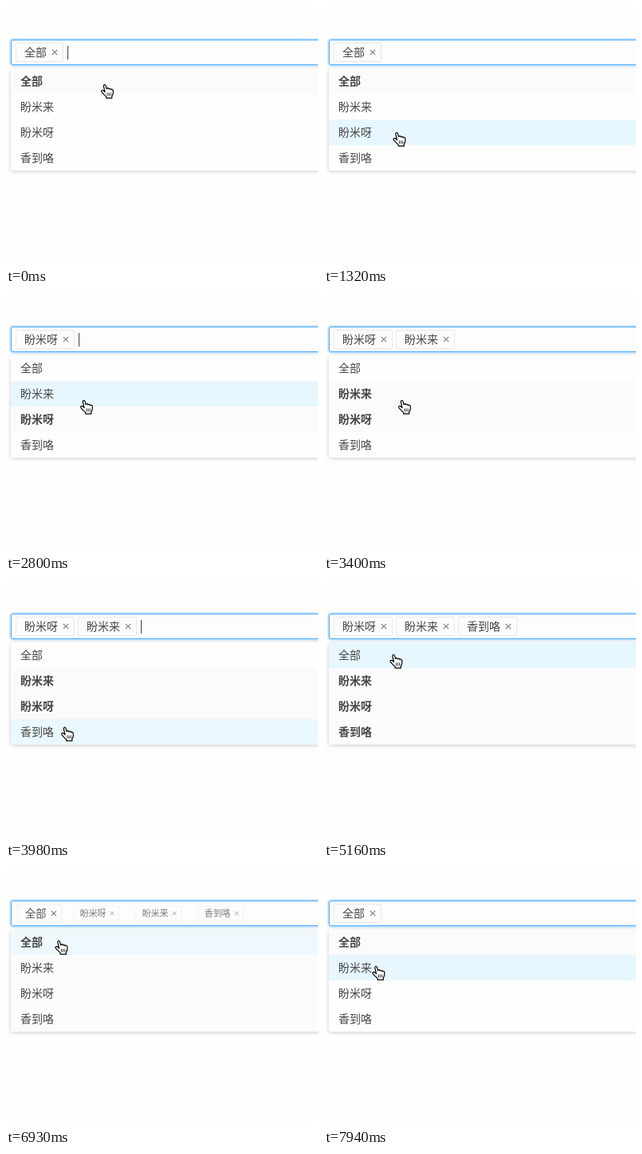
Animation, 391 px wide and 324 px high, one loop 8 s. Source, as an HTML page:

```html
<!DOCTYPE html>
<html lang="zh-CN">
<head>
<meta charset="utf-8">
<title>多选下拉框</title>
<style>
  html, body { margin: 0; width: 100%; height: 100%; overflow: hidden; background: #fefefe; }
  body {
    position: relative;
    font: 14px/22px "Noto Sans CJK SC", "Noto Sans CJK", "Noto Sans", sans-serif;
    color: #484848;
  }
  div, svg { position: absolute; box-sizing: border-box; }
  .field {
    left: 6px; top: 42px; width: 420px; height: 32px;
    border: 1px solid #40a9ff; border-radius: 3px; background: #fdfdfd;
    box-shadow: 0 0 0 2px rgba(24, 144, 255, .2);
  }
  .menu, .shade { left: 6px; top: 78px; width: 420px; height: 128px; border-radius: 4px; }
  .menu { overflow: hidden; }
  .shade { box-shadow: 0 1px 5px rgba(0, 0, 0, .2); }
  .row { left: 0; width: 100%; height: 32px; padding: 4px 12px; white-space: nowrap; }
  .tag {
    top: 46px; height: 24px; padding: 0 20px 0 10px; line-height: 20px; white-space: nowrap;
    border: 1px solid #e8e8e8; border-radius: 2px; background: #fcfcfc;
  }
  .tag svg { right: 6px; top: 7px; width: 8px; height: 8px; }
  .caret { top: 50px; width: 1px; height: 17px; background: #444; }
  .hand { left: 0; top: 0; width: 17px; height: 19px; overflow: visible; }
</style>
</head>
<body>
<div class="field"></div>
<div class="shade"></div>
<div class="menu"></div>
<div class="caret"></div>
<svg class="hand" viewBox="0 0 17 19" stroke="#000" stroke-linejoin="round" stroke-linecap="round">
  <path fill="#fff" stroke-width="1.2" d="M5.5 10.5 L3.9 3.6 C3.3 1.4 5.6 .4 6.4 2.4 L7.6 6.6
    C8.2 5.2 10.1 5.5 10.3 6.9 C11 5.8 12.8 6.2 12.9 7.6 C13.8 6.7 15.6 7.1 15.7 8.9 L15.9 11.6
    C15.9 13.4 14.6 14.4 14.3 16 V18.2 H7.2 V16.6 C5.6 15 3.4 12.9 1.6 10.8 C.2 9 2 7.6 3.6 8.8 Z"/>
  <path fill="none" stroke-width=".8" d="M8.5 11.8v3.2M10.6 11.8v3.2M12.7 11.8v3.2"/>
</svg>

<script>
const LOOP = 8000, TICK = 147.2, LEAD = 12;
const ZOOM = 200, FADE = 300, BLINK = 500;
const ZOOM_IN = 'cubic-bezier(.08,.82,.17,1)', ZOOM_OUT = 'cubic-bezier(.78,.14,.15,.86)';
const HOLD = 'step-end';
const PLAIN = '#fefefe', HOVER = '#e6f7ff', PICKED = '#fbfbfb';
const ALL = '全部', names = [ALL, '盼米来', '盼米呀', '香到咯'];
const clicks = [1520, 3160, 4330, 6836];

// Pointer moves: first tick, last tick, x, y
const moves = [
  [0, 3, 97, 139], [4, 7, 86, 157], [16, 18, 92.5, 133], [23, 27, 68.5, 183], [30, 34, 82, 92],
  [35, 40, 74, 98], [40, 43, 61, 91], [48, 53, 45, 121], [53, 54, 60, 123]
];

const $ = s => document.querySelector(s);
const smooth = p => p * p * (3 - 2 * p);
const clamp = p => Math.min(1, Math.max(0, p));

function handAt(ms) {
  let x = 118.5, y = 97;
  for (const [from, to, toX, toY] of moves) {
    const p = smooth(clamp((ms / TICK - from) / (to - from)));
    x += (toX - x) * p;
    y += (toY - y) * p;
  }
  return { x, y };
}
const hoverAt = ms => names[Math.floor((handAt(ms).y + 1 - 78) / 32)];

const tracks = [];
// steps: [ms, properties, easing to the next step]
function track(el, steps) {
  const list = [...steps, [LOOP, steps[steps.length - 1][1]]];
  const anim = el.animate(
    list.map(([ms, props, easing = HOLD]) => ({ offset: ms / LOOP, easing, ...props })),
    { duration: LOOP, fill: 'both' });
  anim.pause();
  tracks.push(anim);
}

function add(parent, cls, html) {
  const el = document.createElement('div');
  el.className = cls;
  el.innerHTML = html;
  parent.append(el);
  return el;
}

// Replay the clicks: 全部 clears the rest, any other option clears 全部
const widthOf = name => 32 + 14 * name.length;
const tags = [{ name: ALL, x: 12 }];
const states = [{ ms: 0, picked: [ALL], caret: 77 }];
let live = [...tags];
for (const ms of clicks) {
  const name = hoverAt(ms);
  const leaves = tag => name === ALL || tag.name === ALL;
  const leaving = live.filter(leaves);
  const fresh = { name, start: ms };
  tags.push(fresh);
  live = [...live.filter(tag => !leaves(tag)), fresh];
  let x = 12, caret;
  for (const tag of [...live, ...leaving]) {
    if (leaving.includes(tag)) Object.assign(tag, { end: ms, endX: x });
    else tag.x = x;
    x += widthOf(tag.name) + 4;
    if (tag === fresh) caret = x + 1;
  }
  states.push({ ms, picked: live.map(tag => tag.name), caret });
}
const stateAt = ms => states.filter(s => s.ms <= ms).pop();

// Menu rows
names.forEach((name, i) => {
  const el = add($('.menu'), 'row', name);
  el.style.top = i * 32 + 'px';
  track(el, states.map(s => [s.ms, { fontWeight: s.picked.includes(name) ? 600 : 400 }]));

  const colorAt = ms => stateAt(ms).picked.includes(name) ? PICKED : hoverAt(ms) === name ? HOVER : PLAIN;
  const changes = [];
  let last = colorAt(0);
  const steps = [[0, { backgroundColor: last }]];
  for (let ms = 10; ms < LOOP; ms += 10) {
    if (colorAt(ms) === last) continue;
    changes.push({ ms, from: last, to: last = colorAt(ms) });
  }
  changes.forEach(({ ms, from, to }, n) => {
    const next = changes[n + 1] ? changes[n + 1].ms : LOOP;
    steps.push([ms, { backgroundColor: from }, 'ease'], [Math.min(ms + FADE, next), { backgroundColor: to }]);
  });
  track(el, steps);
});

// Tags zoom in at their place and zoom out behind the ones that stay
const CROSS = '<svg viewBox="0 0 8 8" stroke="#808080" stroke-width="1.2"><path d="M.8 .8 7.2 7.2M7.2 .8 .8 7.2"/></svg>';
const shown = x => ({ left: x + 'px', opacity: 1, transform: 'scale(1)' });
const gone = x => ({ left: x + 'px', opacity: 0, transform: 'scale(.2)' });
for (const { name, x, start, end, endX } of tags) {
  const steps = [[0, start ? gone(x) : shown(x)]];
  if (start) steps.push([start, gone(x), ZOOM_IN], [start + ZOOM, shown(x)]);
  if (end) steps.push([end, shown(endX), ZOOM_OUT], [end + ZOOM, gone(endX)]);
  track(add(document.body, 'tag', name + CROSS), steps);
}
document.body.append($('.caret'), $('.hand'));

// The third pick restarts the blinking
const caretOn = ms => (ms + (ms < clicks[2] ? 240 : 710)) % (2 * BLINK) < BLINK;

const begin = performance.now();
function draw() {
  const ms = (performance.now() - begin) % LOOP;
  // The picture advances in even ticks
  const now = Math.floor((ms + LEAD) / TICK) * TICK;
  for (const anim of tracks) anim.currentTime = now;
  const { x, y } = handAt(now);
  $('.hand').style.transform = `translate(${x}px, ${y}px)`;
  $('.caret').style.left = stateAt(now).caret + 'px';
  $('.caret').style.opacity = caretOn(now) ? 1 : 0;
  requestAnimationFrame(draw);
}
draw();
</script>
</body>
</html>
```
